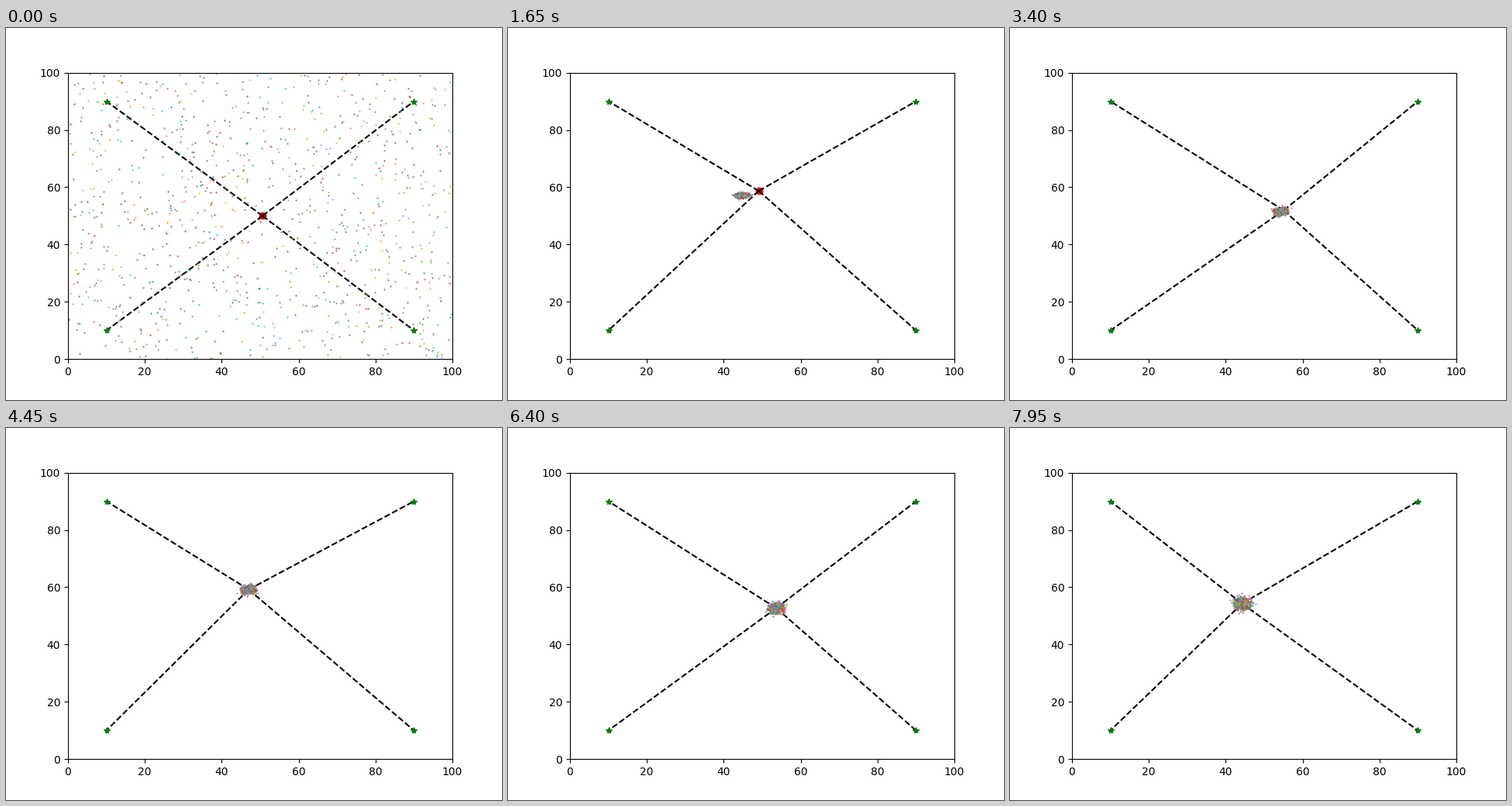
These frames come from a looping animation (640x480 px, 8 s). A matplotlib script:

```python
import numpy as np
import matplotlib.pyplot as plt
from matplotlib.animation import FuncAnimation

FRAMES, STEP_MS = 160, 50
COUNT, LAYERS = 1000, 250
RADIUS = 5.0
PX = np.array([4.96, 3.696])  # pixels per data unit
LANDMARKS = [(x, y) for x in (10, 90) for y in (10, 90)]

# Key points of the robot's path: frame, x, y.
KEY, KEY_X, KEY_Y = np.array([
    (0, 50.6, 50.0), (19, 53.9, 57.15), (47, 48.7, 52.1), (89, 47, 59.2),
    (113, 47.8, 50.1), (144, 49.2, 58.9), (159, 44.25, 54.3)]).T

rng = np.random.default_rng(7)
START = rng.uniform(0, 100, (COUNT, 2))
ANCESTOR = rng.normal(size=(40, 2))[rng.integers(0, 40, COUNT)]
Z1, Z2 = rng.normal(scale=0.85, size=(2, COUNT, 2))
STRAY = np.arange(COUNT) % 40 == 0


def arm(n):
    a = 0.107 * n - 1.47
    return RADIUS * np.cos(a), RADIUS * np.sin(a)


def robot_at(n):
    """Steady circling about a slowly drifting centre."""
    ax_, ay_ = arm(KEY)
    centre = [np.interp(n, KEY, KEY_X - ax_), np.interp(n, KEY, KEY_Y - ay_)]
    return np.array(centre) + arm(n)


def particles_at(n):
    if n == 0:
        return START
    # The estimate lags behind early on, then locks on to the robot.
    lag = 4.5 * np.exp(-((n - 36) / 25) ** 2)
    home = robot_at(n)
    tilt = 0.8 * np.exp(-n / 60) * np.cos(2 * np.pi * (n - 19) / 60)
    c, s = np.cos(tilt), np.sin(tilt)
    z = Z1 * np.cos(0.15 * n) + Z2 * np.sin(0.15 * n)
    size = np.array([4.2 + 0.008 * n, 1 + 0.02 * n])
    pts = home + lag * np.array([-1, -0.35])
    pts = pts + (z * size) @ np.array([[c, s], [-s, c]]) / PX
    pts += 4 * np.exp(-(n - 1) / 4) * ANCESTOR
    if n < 24:
        pts[STRAY] = home + [3.0, -3.0] + z[STRAY] * [0.5, 0.25]
    return pts


fig, ax = plt.subplots(figsize=(6.4, 4.8), dpi=100)
ax.set_xlim(0, 100)
ax.set_ylim(0, 100)

robot, = ax.plot([], [], "ro")
beams = []
for x, y in LANDMARKS:
    beams += ax.plot([], [], "k--")
    ax.plot(x, y, "g*")
dots = [ax.plot([], [], ".", ms=1, color=f"C{k % 10}")[0]
        for k in range(LAYERS)]


def draw(n):
    rx, ry = robot_at(n)
    robot.set_data([rx], [ry])
    for beam, (x, y) in zip(beams, LANDMARKS):
        beam.set_data([rx, x], [ry, y])
    pts = particles_at(n)
    for k, dot in enumerate(dots):
        dot.set_data(pts[k::LAYERS, 0], pts[k::LAYERS, 1])
    return [robot, *beams, *dots]


anim = FuncAnimation(fig, draw, frames=FRAMES, interval=STEP_MS,
                     init_func=lambda: draw(0), repeat=True, repeat_delay=0)
plt.show()
```
